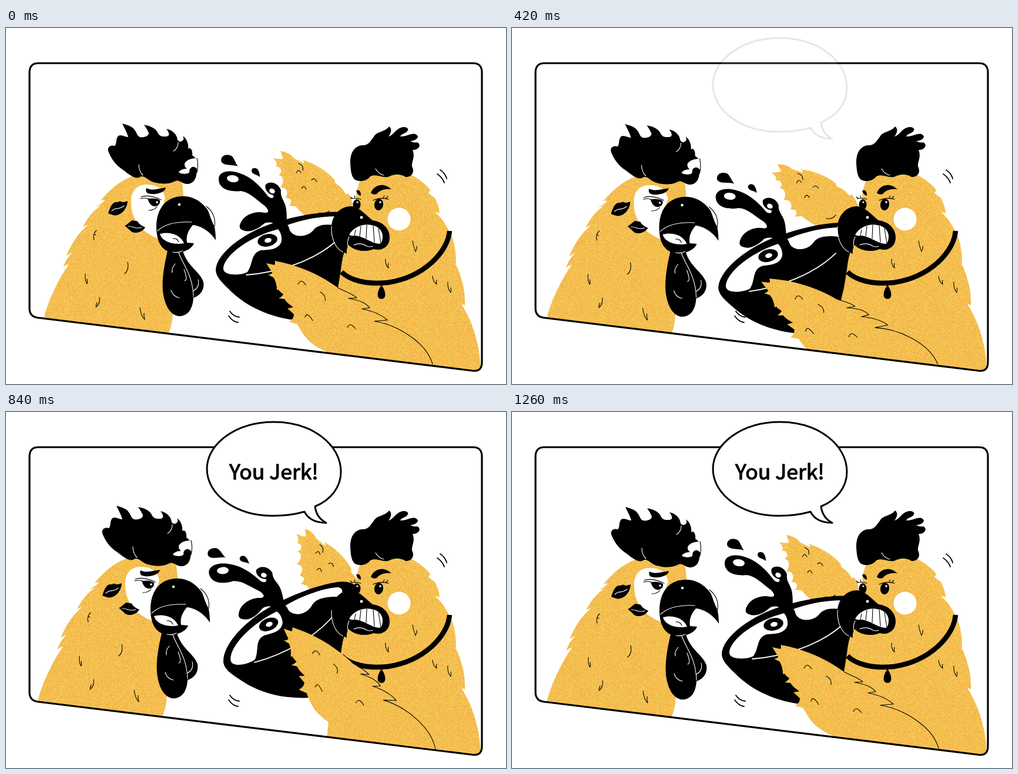
Write an HTML page that moves like this. It is 851 px wide and 607 px high and loops after 2100 ms.

```html
<!DOCTYPE html>
<html lang="en">
<head>
<meta charset="utf-8">
<title>You Jerk!</title>
<style>
  html, body { margin: 0; width: 100%; height: 100%; overflow: hidden; background: #fff; }
  svg { display: block; width: 851px; height: 607px; }
  .y { fill: url(#grain); }
  .w { fill: #fff; }
  .l, .wl { fill: none; stroke: #000; stroke-width: 1.1; stroke-linecap: round; stroke-linejoin: round; }
  .wl { stroke: #fff; }
  .bold { stroke-width: 1.8; }
  .frame { fill: none; stroke: #000; stroke-width: 3.2; stroke-linejoin: round; }
  text {
    font: 500 35.5px "Noto Sans CJK SC", "Noto Sans CJK JP", "Noto Sans CJK", "Noto Sans", sans-serif;
    stroke: #000; stroke-width: 1.2; stroke-linejoin: round;
  }
</style>
</head>
<body>
<svg viewBox="0 0 851 607">
  <defs>
    <pattern id="grain" width="120" height="120" patternUnits="userSpaceOnUse">
      <rect width="120" height="120" fill="#f5be4d"/>
      <path id="dark" fill="#f0a63e"/>
      <path id="light" fill="#f2d468"/>
    </pattern>
    <path id="panel" d="M55 60H795Q810 60 810 76V570Q810 586 795 584.500L54 494Q40 492 40 478V76Q40 60 55 60Z"/>
    <clipPath id="clip"><use href="#panel"/></clipPath>
  </defs>

  <g clip-path="url(#clip)">
    <path class="l bold" d="M739 242Q748 248 750 257M734 249Q743 255 746 264M381 483Q387 492 397 493M379 491Q386 501 395 502"/>

    <!-- startled rooster -->
    <g id="left">
      <path class="y" d="M50 560L64 495C72 465 88 430 107 403Q101 404 97 408Q103 392 113 383Q108 385 103 388C112 366 124 349 140 335Q135 337 131 339C139 323 148 312 162 302Q157 304 152 305Q166 298 168 293Q163 294 161 294C180 272 196 259 222 250L230 240L296 250Q302 268 302 292L290 385L284 487Q283 505 277 520L270 560Z"/>
      <path class="w" d="M213 300C211 280 222 266 240 267C256 267 268 274 271 290L264 310L257 345L259 359C240 352 214 335 213 300Z"/>
      <path d="M174 210C172 202 179 199 185 201C189 198 186 190 191 184C197 181 202 186 208 186C206 178 202 172 198 163C206 165 216 168 219 174C223 179 223 184 228 186C234 187 243 185 243 179Q240 172 235 165C247 167 256 172 259 180Q262 185 268 185C280 186 279 180 273 172C286 175 291 183 292 191Q295 195 299 193C303 191 303 188 301 184C308 189 311 198 310 206C315 202 318 211 317 217L323 222Q328 236 324 250C322 264 312 268 303 265C296 262 292 258 286 262C276 267 262 266 252 263C242 261 238 252 230 253C220 261 207 247 198 241C187 234 179 223 174 210Z"/>
      <path class="w" d="M304 231C308 224 316 222 325 222Q327 231 326 241C320 234 314 236 312 243C315 250 299 250 294 246C297 241 303 240 308 240Q303 236 304 231Z"/>
      <path class="l" d="M325 222Q328 234 325 246"/>
      <path class="wl" d="M226 233Q226 244 233 251M285 210Q293 205 293 195"/>
      <path d="M239 273C247 278 260 274 272 272C271 282 248 286 240 281Q237 277 239 273Z"/>
      <path class="l" d="M230 288C240 284 254 288 264 293M229 291Q236 289 242 291M243 311Q252 311 257 305"/>
      <path d="M241 291C249 290 257 290 262 294C263 301 257 305 252 304C246 303 243 297 241 291Z"/>
      <circle class="w" cx="257" cy="297" r="1.800"/>
      <path d="M174 316C177 305 182 295 190 297Q194 294 198 297Q202 297 207 295C206 308 198 317 189 319C183 321 178 317 174 316ZM202 337C210 334 213 325 219 329Q224 328 226 333Q230 337 237 340C231 349 218 352 212 346Q207 341 202 337Z"/>
      <path class="wl" d="M180 312C188 304 190 312 201 303M208 338C215 337 220 344 231 340"/>
      <path d="M275 380C268 410 263 440 270 464C276 486 289 493 299 491C313 488 318 475 319 460C332 456 338 445 336 433C331 416 308 406 301 380Z"/>
      <path class="wl" d="M294 383C300 402 318 420 319 458M288 402Q281 410 283 417M281 447Q284 458 295 460M327 429Q330 442 319 448M303 412Q310 430 304 431"/>
      <path d="M256 342C255 311 270 289 297 287C322 285 340 302 348 318C355 332 357 348 357 362C349 349 333 337 318 336C310 345 306 355 308 366L320 367C316 378 300 384 285 383C267 381 257 368 256 342Z"/>
      <path class="w" d="M341 304C351 312 357 324 355 338C350 331 347 318 341 304Z"/>
      <path class="l" d="M341 304C351 312 357 324 355 338"/>
      <path class="w" d="M262 351C275 347 296 350 303 367C288 370 266 366 262 351Z"/>
      <path class="wl" d="M258 346C272 332 294 330 316 331M284 382Q293 384 300 380"/>
      <path class="l" d="M284 359Q291 358 294 365"/>
      <circle class="w" cx="295" cy="301" r="2.200"/>
      <path class="l" d="M154 345Q147 352 150 361M150 352L153 353M207 399Q210 412 202 419M135 419Q134 432 138 436Q139 432 138 428M159 459Q161 470 153 476M155 468L153 474M228 477Q230 492 236 497Q234 491 235 486"/>
    </g>

    <!-- raised wing -->
    <g id="back">
      <path class="y" d="M455 222Q464 224 471 223Q470 216 467 210C478 211 486 216 490 222L508 231Q507 227 505 225C528 232 548 245 560 260Q558 263 563 266Q572 272 579 284L583 282Q590 295 592 312L570 345L515 325Q500 313 493 304L481 303Q487 298 484 292L476 289Q481 282 476 274L467 271Q474 264 470 254L464 250Q472 246 466 238L459 236Q464 232 455 222Z"/>
      <path class="l" d="M498 231Q507 234 505 243M494 247Q498 239 502 247M520 259Q525 254 529 262M503 274Q507 266 511 275M533 315Q543 319 550 312"/>
    </g>

    <!-- bowl and splash -->
    <g id="cup">
      <path d="M357 412C359 386 396 356 440 338C490 319 545 311 580 314C603 317 616 334 606 365L590 470C560 482 528 502 490 498C440 491 403 470 379 445C364 431 357 422 357 412Z"/>
      <path class="w" d="M370 408C374 386 414 356 463 343Q470 351 469 363C465 379 446 378 434 379C416 384 421 402 411 416C402 422 367 424 370 408Z"/>
      <path class="w" d="M479 336C505 326 545 319 572 322C583 325 580 336 569 338C546 333 530 335 523 345C512 357 494 357 486 349C481 344 483 340 479 336Z"/>
      <ellipse cx="445" cy="362" rx="17" ry="10.500" transform="rotate(-12 445 362)"/>
      <ellipse class="w" cx="446" cy="362" rx="6" ry="4" transform="rotate(-12 446 362)"/>
      <path class="wl bold" d="M409 421C462 417 522 398 560 365"/>
      <path d="M362 259C361 245 378 241 396 247C416 253 432 268 446 287C452 292 457 290 455 285C446 284 439 274 442 267C449 260 464 264 468 277C466 290 476 296 477 310C479 325 475 335 485 350L470 352C462 336 455 328 440 333C430 342 415 350 404 345C397 343 396 338 400 331C406 318 425 311 440 315C450 316 446 308 440 303C425 292 415 280 400 278C382 280 363 275 362 259Z"/>
      <ellipse class="w" cx="386" cy="257" rx="10" ry="6" transform="rotate(8 386 257)"/>
      <ellipse class="w" cx="453" cy="278" rx="5" ry="4" transform="rotate(30 453 278)"/>
      <path d="M366 226C366 216 378 214 385 219C390 225 391 232 395 236C385 232 368 236 366 226ZM418 243C418 238 426 237 429 242Q432 247 432 254C427 249 418 250 418 243Z"/>
    </g>

    <!-- angry hen -->
    <path class="y" d="M604 258C599 268 596 280 596 292L580 372Q573 384 570 412L565 443L556 480L549 525L545 570V620H830L808 585Q808 556 799 525C793 502 783 484 775 470L781 473Q782 444 771 416Q768 404 760 398L766 403Q766 365 754 346Q744 325 730 314Q735 314 738 317Q737 302 730 290Q722 284 719 281Q722 278 722 276Q707 258 686 249L680 235H620Z"/>
    <path d="M586 232C585 214 592 202 605 200C617 201 620 193 627 184C632 176 644 178 652 168C658 172 655 180 651 185C660 183 662 172 675 169C687 168 687 176 677 180Q672 182 671 185C684 185 688 179 697 181C705 185 700 191 688 193Q694 196 700 195C707 198 704 208 692 208C697 220 690 228 691 236C696 246 691 254 680 254C670 248 661 249 650 254C640 256 630 248 620 253C614 262 600 263 593 258C587 251 587 242 586 232Z"/>
    <path class="wl" d="M629 240Q634 249 643 251"/>
    <circle class="w" cx="669" cy="326" r="19.500"/>
    <path d="M621 281C626 268 642 262 656 275C646 274 638 275 631 283Q624 285 621 281ZM596 277Q604 274 604 286Q598 285 596 277Z"/>
    <ellipse cx="634.500" cy="301" rx="7.500" ry="10" transform="rotate(10 634.500 301)"/>
    <ellipse cx="597" cy="301" rx="6.500" ry="9"/>
    <circle class="w" cx="637" cy="297" r="1.800"/>
    <circle class="w" cx="598" cy="297" r="1.600"/>
    <path class="l" d="M625 294Q637 288 651 292M642 290L644 286M646 291L650 287M604 292Q596 289 587 291M594 290L593 286M590 291L586 288"/>
    <path fill="none" stroke="#000" stroke-width="8.500" d="M755 346C752 382 711 425 650 434C614 438 585 430 571 416"/>
    <path d="M639 438C647 449 648 462 639 462C630 462 631 449 639 438Z"/>
    <path d="M554 345C552 320 570 303 588 304C603 306 612 319 624 328C641 330 653 342 653 357C653 373 640 381 626 377C612 383 592 380 583 370Q579 376 580 385C564 378 556 365 554 345Z"/>
    <path class="wl" d="M554 338C553 358 560 375 573 382M582 372Q580 364 584 356M592 370Q604 365 614 372Q620 374 624 372"/>
    <path class="w" d="M584 353C590 341 606 333 622 336C635 338 642 347 641 358Q640 368 635 368C622 367 610 356 596 354Q589 355 584 353Z"/>
    <path class="l" d="M595 344L593 354M604 338L602 355M614 336L613 359M625 337L627 365M634 342L638 367"/>
    <circle class="w" cx="605" cy="323" r="2.400"/>
    <path class="l" d="M646 394Q645 404 651 409Q650 404 651 401M692 363Q694 374 697 381Q700 376 699 372M726 423Q727 433 733 437Q732 432 733 430M752 433Q751 444 757 451Q758 446 757 443"/>

    <g id="front">
      <path class="y" d="M443 401Q452 403 457 404Q459 400 457 397C495 404 530 418 565 443L597 460L619 477L649 498L726 573V650H600L548 553Q528 545 515 533Q502 519 496 505L482 501Q490 496 490 488L479 478Q485 477 489 476Q477 468 474 462L464 461Q470 458 472 454Q465 449 464 446L461 447Q461 434 455 425L446 421Q452 420 453 417Q448 409 443 401Z"/>
      <path class="l" d="M565 443C578 450 588 452 597 460L583 461C600 464 612 468 619 477L606 479C622 482 638 488 649 498L627 500C665 506 715 535 726 573M497 437Q502 426 510 438M535 450Q545 456 543 465M509 493Q512 482 522 499M581 511Q585 500 595 513"/>
    </g>
  </g>

  <use href="#panel" class="frame"/>
  <g id="bubble">
    <path fill="#fff" stroke="#000" stroke-width="3" stroke-linejoin="round" d="M526 161C553 150 570 128 570 102C570 55 520 17 456 17C393 17 342 53 342 97C342 141 391 177 454 177Q483 177 508 170C514 182 525 189 545 189Q528 180 526 161Z"/>
    <text id="words" x="380" y="115">You Jerk!</text>
  </g>
</svg>
<script>
  const $ = id => document.getElementById(id);
  const LOOP = 2100, STEP = 60, END = 1260;
  const times = [0, 300, 420, 600, 840, 1020, END];

  // one value per entry of `times`
  const tracks = {
    leftX:  [0, -6, -5.5, 2.5, -10, -6, -5],
    leftY:  [0, -1, 1, 0, -3, -2, -1],
    backR:  [0, 5.4, -9.9, -4.5, 13, 5.8, 0],
    backX:  [0, 3, 0, 6, 16, 6, 0],
    backY:  [0, 2, 0, 8, 14, 5, 0],
    cupR:   [0, -9, -3.5, -3.5, -11, -5, 0],
    cupX:   [0, -3, -9, -13, 2, 0, 0],
    cupY:   [0, -9, 26, 39, 0, -3, 0],
    frontR: [0, 1.2, -6.3, -5.1, 7.4, 3.6, 0],
    frontX: [0, 0, -1, -4, 4, 1, 0],
    frontY: [0, 0, -2, 0, 5, 3, 0]
  };

  const clamp = v => Math.max(0, Math.min(1, v));

  // cubic Hermite curve through the keys
  function at(v, t) {
    const last = times.length - 1;
    let i = 0;
    while (i < last - 1 && t >= times[i + 1]) i++;
    const slope = k => k === 0 || k === last ? 0 : (v[k + 1] - v[k - 1]) / (times[k + 1] - times[k - 1]);
    const h = times[i + 1] - times[i], u = (t - times[i]) / h, w = 1 - u;
    return v[i] * (1 + 2 * u) * w * w + v[i + 1] * u * u * (3 - 2 * u)
      + h * u * w * (slope(i) * w - slope(i + 1) * u);
  }

  function place(id, x, y, r = 0, px = 0, py = 0) {
    $(id).setAttribute('transform', `translate(${x} ${y}) rotate(${r} ${px} ${py})`);
  }

  function draw(t) {
    const p = {};
    for (const k in tracks) p[k] = at(tracks[k], t);
    place('left', p.leftX, p.leftY);
    place('back', p.backX, p.backY, p.backR, 590, 310);
    place('cup', p.cupX, p.cupY, p.cupR, 446, 362);
    place('front', p.frontX, p.frontY, p.frontR, 740, 580);
    $('bubble').setAttribute('opacity', clamp((t - 404) / 170));
    $('words').setAttribute('opacity', clamp((t - 540) / 170));
  }

  function speckle(seed, count) {
    let d = '';
    const rnd = () => (seed = (seed * 16807) % 2147483647) / 2147483647;
    for (let i = 0; i < count; i++) d += `M${rnd() * 120 | 0} ${rnd() * 120 | 0}h1v1h-1z`;
    return d;
  }
  $('dark').setAttribute('d', speckle(71, 2600));
  $('light').setAttribute('d', speckle(1234, 2600));

  let shown = -1;
  function tick() {
    const t = Math.min(END, Math.floor(performance.now() % LOOP / STEP) * STEP);
    if (t !== shown) draw(shown = t);
    requestAnimationFrame(tick);
  }
  tick();
</script>
</body>
</html>
```
